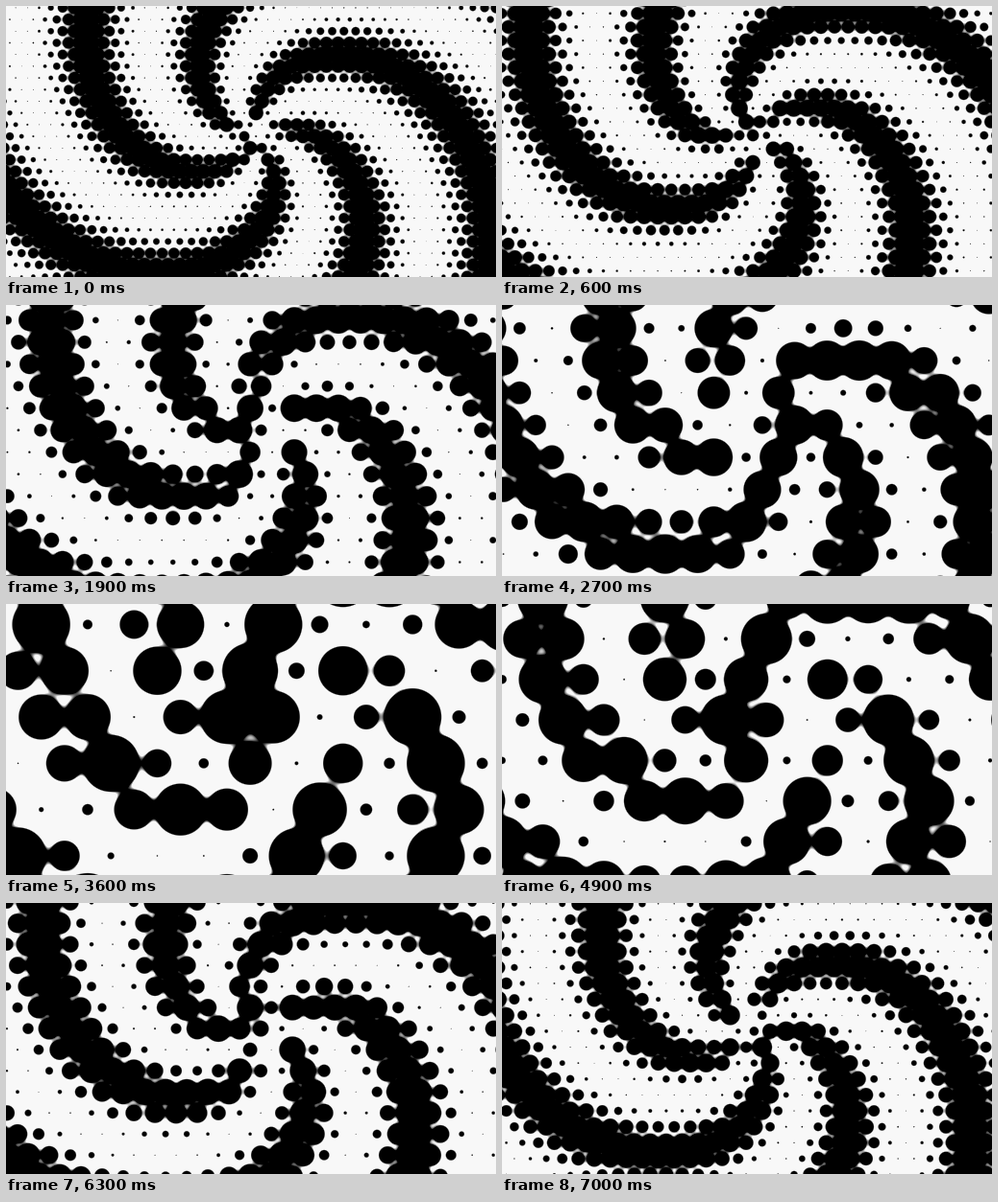
These frames come from a looping animation (510 px wide and 283 px high, 7.1 s). An HTML page with a canvas:

```html
<!DOCTYPE html>
<html lang="en">
<head>
<meta charset="utf-8">
<title>Halftone spiral</title>
<style>
html, body { margin: 0; width: 100%; height: 100%; overflow: hidden; background: #f8f8f8; }
canvas { display: block; width: 510px; height: 283px; }
</style>
</head>
<body>
<canvas id="stage" width="510" height="283"></canvas>
<script>
const W = 510, H = 283, CX = 254.1, CY = 142.2;
const SPAN = 512.5;   // width of the pattern's unit square
const STEP = 100, LOOP = 7100;
const PAPER = 248;
const ARMS = 5, TWIST = 20.8 / SPAN;
const MELT = 0.22;    // reach of the blend between dots, in cells
const SOFT = 1.2;     // edge softness in pixels

const ctx = document.getElementById('stage').getContext('2d');
const image = ctx.createImageData(W, H);
const pixels = new Uint32Array(image.data.buffer);
const grey = Uint32Array.from({ length: 256 }, (_, v) => (0xff000000 | v * 0x010101) >>> 0);

const cellSize = t => SPAN / (30 + 20 * Math.cos(0.927 + 0.5465 * t));
const phase = t => -2.48 - 4.375 * t;
const stagger = row => (row & 1 ? 0.5 : 0);

// Dot radius, in cells; the spiral is sampled at the lower left corner of the cell
function radius(col, row, cell, peak) {
  const x = col + stagger(row) - 0.5, y = row + 1;
  const wave = ARMS * Math.atan2(y, x) - TWIST * cell * Math.hypot(x, y) - peak;
  return 0.012 + 0.615 * (1 + Math.cos(wave)) / 2;
}

function draw(t) {
  const cell = cellSize(t), peak = phase(t);
  const cols = Math.ceil(W / 2 / cell) + 3, rows = Math.ceil(H / 2 / cell) + 3;
  const stride = 2 * cols + 1;
  const radii = new Float64Array(stride * (2 * rows + 1));
  for (let r = -rows; r <= rows; r++)
    for (let c = -cols; c <= cols; c++)
      radii[(r + rows) * stride + c + cols] = radius(c, r, cell, peak);

  for (let py = 0, p = 0; py < H; py++) {
    const y = (py + 0.5 - CY) / cell, row = Math.floor(y);
    for (let px = 0; px < W; px++, p++) {
      const x = (px + 0.5 - CX) / cell;
      let field = 9;
      for (let r = row - 1; r <= row + 1; r++) {
        const shift = stagger(r), mid = Math.round(x - shift);
        const dy = y - r - 0.5, base = (r + rows) * stride + cols;
        for (let c = mid - 1; c <= mid + 1; c++) {
          const dx = x - c - shift;
          const d = Math.sqrt(dx * dx + dy * dy) - radii[base + c];
          const h = MELT - Math.abs(field - d);
          field = Math.min(field, d);
          if (h > 0) field -= h * h / (4 * MELT);
        }
      }
      const light = Math.min(1, Math.max(0, field * cell / SOFT + 0.5));
      pixels[p] = grey[Math.round(light * PAPER)];
    }
  }
  ctx.putImageData(image, 0, 0);
}

const start = performance.now();
let shown = -1;
function tick() {
  const step = Math.floor(((performance.now() - start) % LOOP) / STEP);
  if (step !== shown) {
    shown = step;
    draw(step * STEP / 1000);
  }
  requestAnimationFrame(tick);
}
tick();
</script>
</body>
</html>
```
